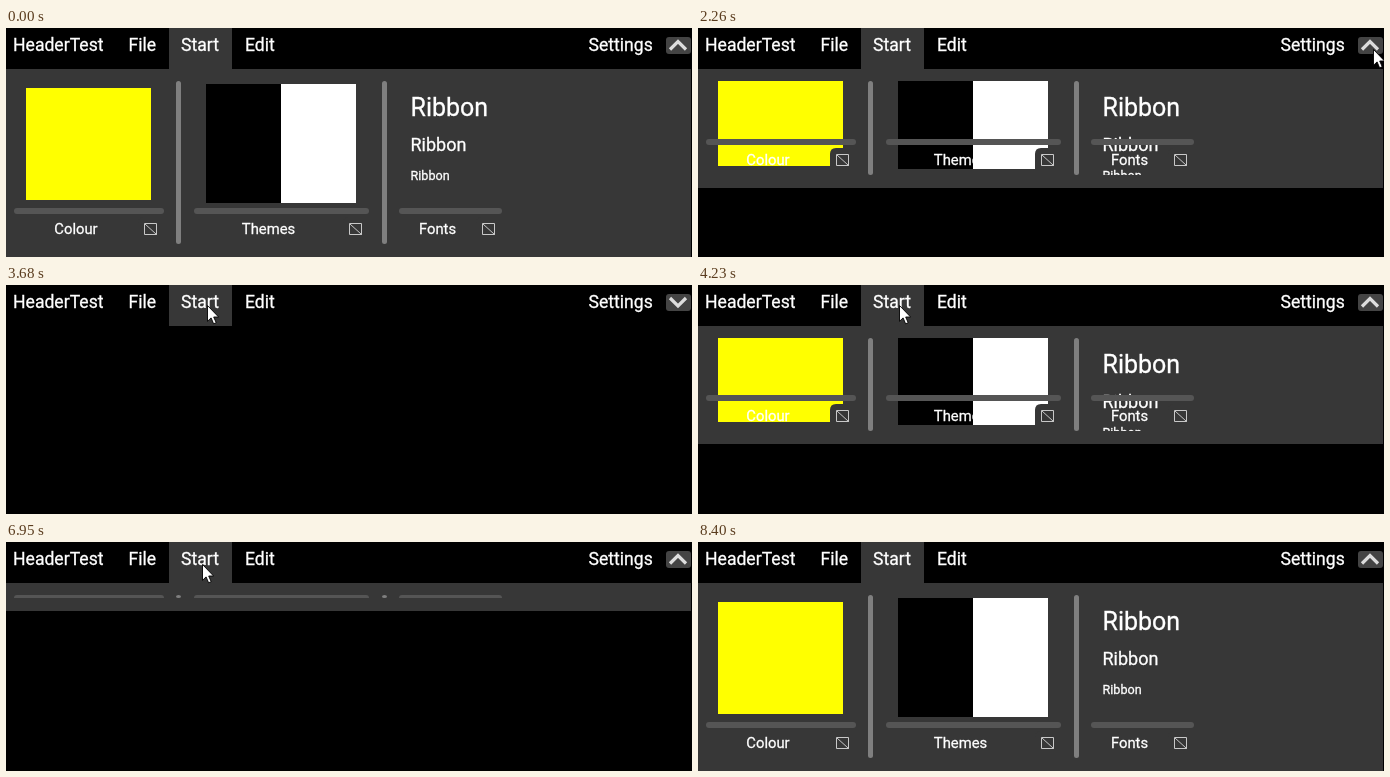
An HTML page for the animation above (8.84 s loop, 686 px wide and 229 px high).

```html
<!DOCTYPE html>
<html lang="en">
<head>
<meta charset="utf-8">
<title>Ribbon header</title>
<style>
  html, body { margin: 0; width: 100%; height: 100%; overflow: hidden; background: #000; }
  svg { display: block; font-family: Roboto, Arial, sans-serif; fill: #fff; }
  text { stroke: #fff; stroke-width: .3px; }
</style>
</head>
<body>
<svg width="686" height="229" viewBox="0 0 686 229">
  <defs>
    <clipPath id="clip"><rect id="clipBox" y="53" width="685"/></clipPath>
    <g id="launcher" fill="none" stroke="#c8c8c8">
      <path stroke="none" fill="#373737" d="M-6 37V15q0-6 6-6h20v28z"/>
      <path d="M.5 15.5h12v11H.5zM1 16l11 10M6.5 26.5h6v-6"/>
    </g>
  </defs>

  <rect id="panel" y="41" width="685" fill="#373737"/>
  <rect id="tab" height="41" fill="#373737"/>

  <g font-size="17.6">
    <text x="7" y="23">HeaderTest</text>
    <text x="122.5" y="23">File</text>
    <text x="175" y="23">Start</text>
    <text x="239" y="23">Edit</text>
    <text x="582.5" y="23">Settings</text>
  </g>
  <rect x="660" y="9" width="25" height="17" rx="3" fill="#444"/>
  <path id="chevron" fill="none" stroke="#ddd" stroke-width="3.2"/>

  <g id="content" clip-path="url(#clip)">
    <g id="swatches">
      <path fill="#ff0" d="M20-56h125V56H20z"/>
      <path fill="#000" d="M200-60h75V59h-75z"/>
      <path d="M275-60h75V59h-75z"/>
    </g>
    <text x="404.5" y="88" font-size="25">Ribbon</text>
    <text x="404.5" y="123" font-size="18">Ribbon</text>
    <text x="404.5" y="152" font-size="12.6">Ribbon</text>
    <g id="footer" font-size="14.8" text-anchor="middle"></g>
    <g id="dividers" fill="#7f7f7f"></g>
  </g>

  <path id="cursor" d="M.5 .5v15.8l3.6-3.4 2.5 5.9 2.6-1.1-2.5-5.7h4.9z" stroke="#000" stroke-width=".9"/>
</svg>
<script>
  const LOOP = 8840, SLIDE = 350, TOP = 41, FULL = 188, INSET = 53;
  const $ = id => document.getElementById(id);
  const set = (el, attrs) => { for (const k in attrs) el.setAttribute(k, attrs[k]); };
  const clamp = v => Math.max(0, Math.min(1, v));
  const smooth = v => v * v * (3 - 2 * v);

  // Ribbon groups sit side by side, with a divider in each gap
  const groups = [['Colour', 150], ['Themes', 175], ['Fonts', 103]];
  let left = 8;
  groups.forEach(([label, width], i) => {
    const right = left + width;
    $('footer').innerHTML += `
      <rect x="${left}" width="${width}" height="6" rx="3" fill="#555"/>
      <use href="#launcher" x="${right - 20}"/>
      <text x="${(left + right - 26) / 2}" y="26">${label}</text>`;
    if (i < groups.length - 1) $('dividers').innerHTML +=
      `<rect x="${right + 12 + i}" y="${INSET}" width="5" rx="2.5"/>`;
    left = right + 30;
  });

  // Each click closes or opens the panel in turn
  const clicks = [1245, 2039, 3237, 4011, 5464, 6899];
  const editFrom = 4740, editTo = 6200;

  const enter = 260, leave = 8400;
  const entry = { x: 652, y: 228 };
  const glides = [
    { at: enter, time: 590, x: 675, y: 21 },
    { at: 2420, time: 760, x: 190, y: 21 },
    { at: 3600, time: 80, x: 201, y: 20 },
    { at: 4430, time: 360, x: 255, y: 13 },
    { at: 5110, time: 60, x: 259, y: 13 },
    { at: 5860, time: 320, x: 196, y: 22 },
    { at: 7290, time: 1090, x: 671, y: 187 }
  ];

  function drawCursor(t) {
    let { x, y } = entry;
    for (const g of glides) {
      const k = smooth(clamp((t - g.at) / g.time));
      x += (g.x - x) * k;
      y += (g.y - y) * k;
    }
    set($('cursor'), {
      visibility: t >= enter && t < leave ? 'visible' : 'hidden',
      transform: `translate(${Math.round(x)} ${Math.round(y)})`
    });
  }

  function drawPanel(t) {
    const past = clicks.filter(c => c <= t);
    const open = past.length % 2 === 0;
    const p = past.length ? clamp((t - past.at(-1)) / SLIDE) : 1;
    const bottom = TOP + Math.round(FULL * (open ? p : 1 - p));
    const height = Math.max(0, bottom - 66);
    const rowEnd = Math.max(INSET, bottom - 50);

    set($('panel'), { height: bottom - TOP });
    set($('chevron'), { d: open ? 'M664 21.5l8-8 8 8' : 'M664 13l8 8 8-8' });
    set($('clipBox'), { height });
    set($('swatches'), { transform: `translate(0 ${Math.ceil((INSET + rowEnd) / 2)})` });
    set($('footer'), { transform: `translate(0 ${Math.max(INSET, bottom - 49)})` });
    for (const d of $('dividers').children) set(d, { height });
  }

  function drawTab(t) {
    const edit = t >= editFrom && t < editTo;
    set($('tab'), edit ? { x: 227, width: 55 } : { x: 163, width: 63 });
    set($('content'), { visibility: edit ? 'hidden' : 'visible' });
  }

  const start = performance.now();
  (function tick() {
    const t = (performance.now() - start) % LOOP;
    drawPanel(t);
    drawTab(t);
    drawCursor(t);
    requestAnimationFrame(tick);
  })();
</script>
</body>
</html>
```
